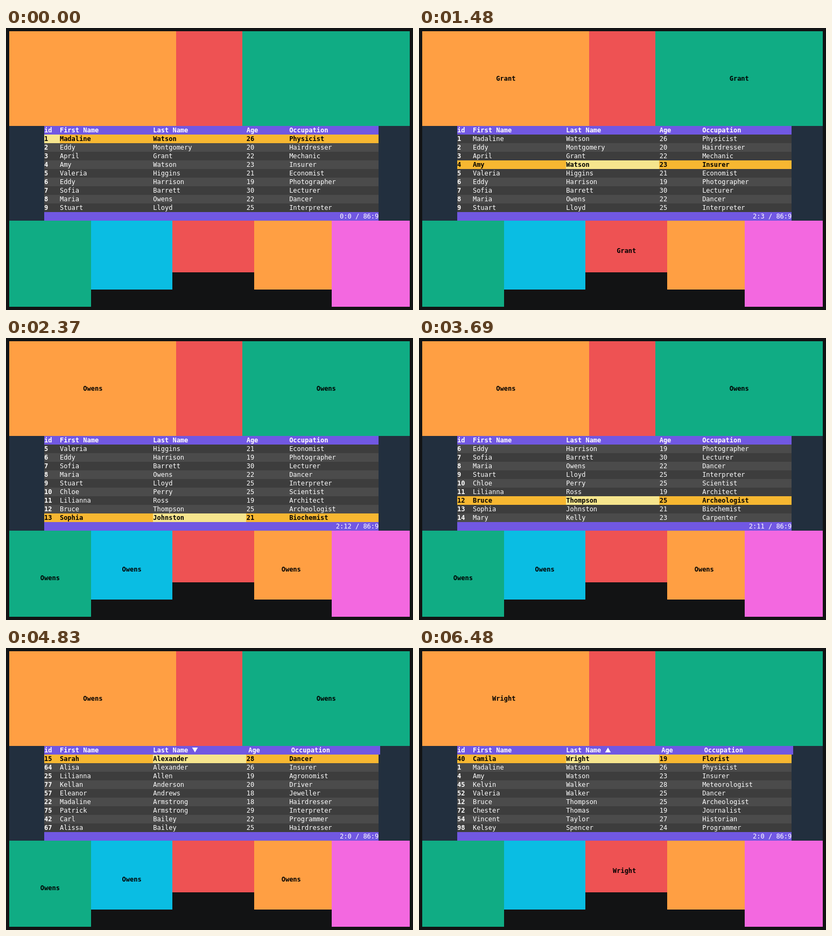
Animation, 756 px wide and 524 px high, one loop 8 s. Source, as an HTML page with a canvas:

```html
<!DOCTYPE html>
<html lang="en">
<head>
<meta charset="utf-8">
<style>
html, body { margin: 0; width: 756px; height: 524px; overflow: hidden; background: #121314; }
canvas { display: block; }
</style>
</head>
<body>
<canvas id="stage" width="756" height="524"></canvas>
<script>
const ctx = document.getElementById('stage').getContext('2d');
const LOOP = 8000, VISIBLE = 9;
const CELL_W = 7.224, CELL_H = 16, PAD = 6;
const FONT = '12px "DejaVu Sans Mono", monospace';
const TABLE_ROW = 11, TABLE_END = 95;
const COLS = [9, 13, 37, 61, 72];
const HEADERS = ['id', 'First Name', 'Last Name', 'Age', 'Occupation'];
const PURPLE = '#7158e2';

const parse = text => text.trim().split('\n').map(line => line.split(' '));

const VIEWS = [`
1 Madaline Watson 26 Physicist
2 Eddy Montgomery 20 Hairdresser
3 April Grant 22 Mechanic
4 Amy Watson 23 Insurer
5 Valeria Higgins 21 Economist
6 Eddy Harrison 19 Photographer
7 Sofia Barrett 30 Lecturer
8 Maria Owens 22 Dancer
9 Stuart Lloyd 25 Interpreter
10 Chloe Perry 25 Scientist
11 Lilianna Ross 19 Architect
12 Bruce Thompson 25 Archeologist
13 Sophia Johnston 21 Biochemist
14 Mary Kelly 23 Carpenter`, `
15 Sarah Alexander 28 Dancer
64 Alisa Alexander 26 Insurer
25 Lilianna Allen 19 Agronomist
77 Kellan Anderson 20 Driver
57 Eleanor Andrews 18 Jeweller
22 Madaline Armstrong 18 Hairdresser
75 Patrick Armstrong 29 Interpreter
42 Carl Bailey 22 Programmer
67 Alissa Bailey 25 Hairdresser`, `
40 Camila Wright 19 Florist
1 Madaline Watson 26 Physicist
4 Amy Watson 23 Insurer
45 Kelvin Walker 28 Meteorologist
52 Valeria Walker 25 Dancer
12 Bruce Thompson 25 Archeologist
72 Chester Thomas 19 Journalist
54 Vincent Taylor 27 Historian
98 Kelsey Spencer 24 Programmer`].map(parse);

// Panels: colour, column, row, width and height in cells
const PANELS = [
  ['#ff9f43', 0, 0, 43, 11], ['#ee5253', 43, 0, 17, 11], ['#10ac84', 60, 0, 43, 11],
  ['#10ac84', 0, 22, 21, 10], ['#0abde3', 21, 22, 21, 8], ['#ee5253', 42, 22, 21, 6],
  ['#ff9f43', 63, 22, 20, 8], ['#f368e0', 83, 22, 20, 10]
];

// Cursor moves: time, column, row
const MOVES = [
  [0, 0, 0], [260, 0, 1], [320, 0, 2], [710, 1, 2], [1090, 2, 2],
  [1480, 2, 3], [1540, 2, 4], [1670, 2, 6], [1800, 2, 7],
  ...[8, 9, 10, 11, 12].map((row, i) => [2130 + 60 * i, 2, row]),
  [3370, 2, 13], [3630, 2, 12], [3690, 2, 11],
  ...[10, 8, 7, 5, 4, 2, 1, 0].map((row, i) => [3950 + 60 * i, 2, row])
];

// Sort changes: time, view
const SORTS = [[0, 0], [4830, 1], [6150, 2]];

// Messages: time, text, receiving panels
const MESSAGES = [
  [0, '', []], [520, '3', [0, 7]], [900, 'April', [0, 6]], [1290, 'Grant', [0, 2, 5]],
  [2000, 'Owens', [0, 2, 3, 4, 6]], [5230, 'Alexander', [4, 7]],
  [5760, 'Alexander', [2, 7]], [6480, 'Wright', [0, 5]]
];

const past = (list, t) => list.filter(entry => entry[0] <= t);
const latest = (list, t) => past(list, t).pop();
const px = col => PAD + col * CELL_W;
const py = row => PAD + row * CELL_H;

function box(color, col, row, w, h = 1, extra = 0) {
  const x = Math.floor(px(col) + 0.3);
  ctx.fillStyle = color;
  ctx.fillRect(x, py(row), Math.floor(px(col + w) + 0.3) + extra - x, h * CELL_H);
}

function text(str, col, row, color, bold, shift = 0) {
  ctx.font = (bold ? 'bold ' : '') + FONT;
  ctx.fillStyle = color;
  ctx.fillText(str, px(col) + shift, py(row) + 12);
}

function arrow(up) {
  const [tip, base] = up ? [185, 194] : [194, 185];
  ctx.fillStyle = '#fff';
  ctx.beginPath();
  ctx.moveTo(345.7, base);
  ctx.lineTo(356.3, base);
  ctx.lineTo(351, tip);
  ctx.fill();
}

function drawPanels(t) {
  const [, message, receivers] = latest(MESSAGES, t);
  PANELS.forEach(([color, col, row, w, h], i) => {
    box(color, col, row, w, h);
    if (!receivers.includes(i)) return;
    const left = col + Math.floor((w - message.length) / 2);
    text(message, left, row + Math.floor(h / 2), '#000', true);
  });
}

function drawTable(t) {
  const [, view] = latest(SORTS, t);
  const moves = past(MOVES, t);
  const [, curCol, curRow] = moves[moves.length - 1];
  const top = moves.reduce((y, [, , row]) => Math.min(row, Math.max(y, row - VISIBLE + 1)), 0);
  const width = TABLE_END - COLS[0];

  box('#222f3e', 0, TABLE_ROW, 103, 11);
  // The sort arrow is wider than a cell and pushes the rest of the header
  const push = view ? 3.5 : 0;
  box(PURPLE, COLS[0], TABLE_ROW, width, 1, Math.floor(push));
  HEADERS.forEach((name, c) => text(name, COLS[c], TABLE_ROW, '#fff', true, c > 2 ? push : 0));
  if (view) arrow(view === 2);

  VIEWS[view].slice(top, top + VISIBLE).forEach((cells, i) => {
    const index = top + i, y = TABLE_ROW + 1 + i, active = index === curRow;
    box(active ? '#f7b731' : index % 2 ? '#4b4b4b' : '#3d3d3d', COLS[0], y, width);
    if (active) box('#f6e58d', COLS[curCol], y, COLS[curCol + 1] - COLS[curCol]);
    cells.forEach((cell, c) => text(cell, COLS[c], y, active ? '#000' : '#fff', active || c === 0));
  });

  const status = `${curCol}:${curRow} / 86:9`;
  box(PURPLE, COLS[0], TABLE_ROW + 10, width);
  text(status, TABLE_END - status.length, TABLE_ROW + 10, '#fff');
}

const start = performance.now();
function frame() {
  const t = (performance.now() - start) % LOOP;
  ctx.fillStyle = '#121314';
  ctx.fillRect(0, 0, 756, 524);
  drawPanels(t);
  drawTable(t);
  requestAnimationFrame(frame);
}
frame();
</script>
</body>
</html>
```
